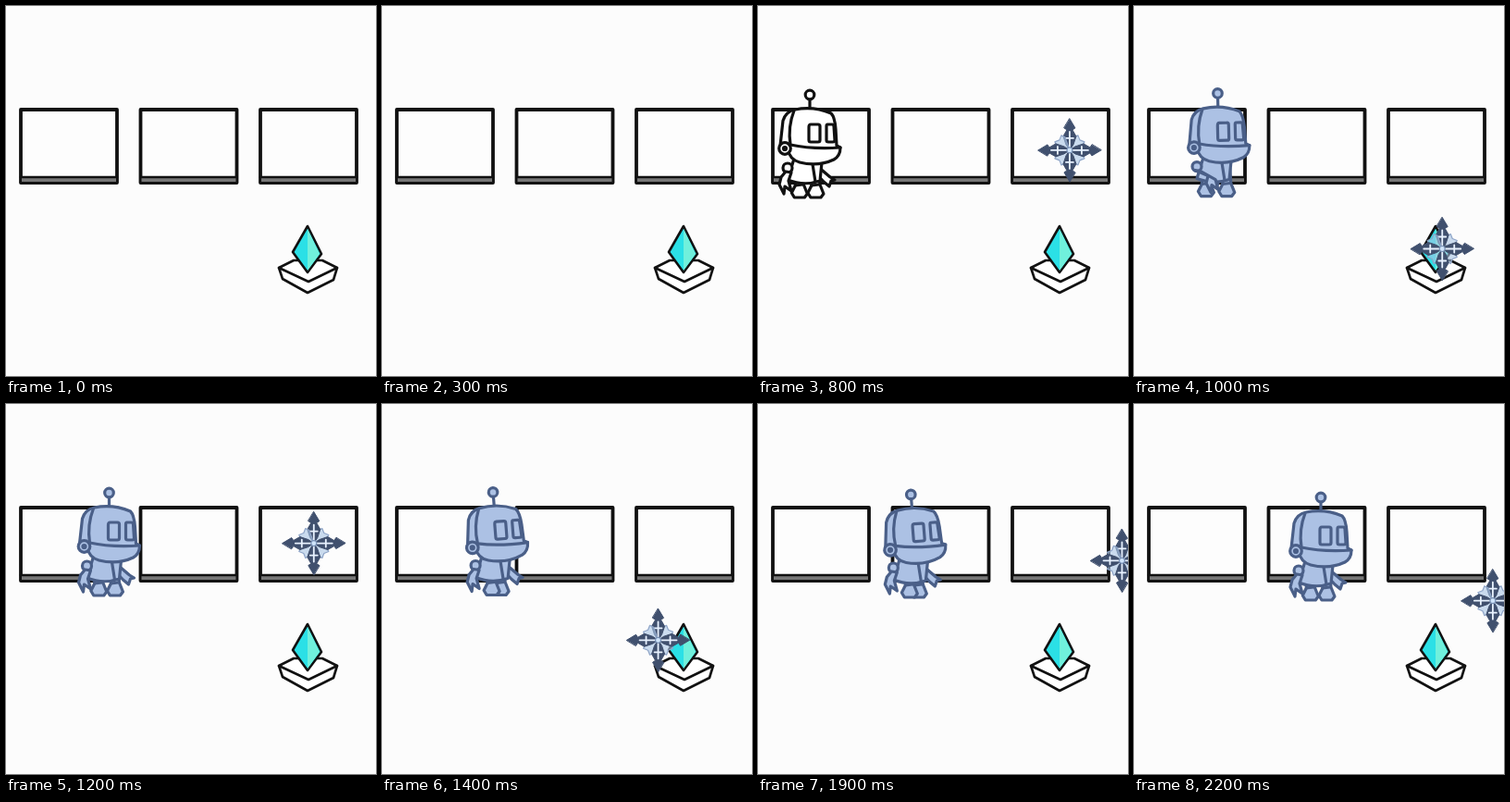
Animation of 400x400 px, one loop 2300 ms. Source, as an HTML page with a canvas:

```html
<!DOCTYPE html>
<html lang="en">
<head>
<meta charset="utf-8">
<title>Robot and crystal</title>
<style>
html, body { margin: 0; width: 100%; height: 100%; overflow: hidden; background: #fcfcfc; }
canvas { display: block; filter: blur(.6px); }
</style>
</head>
<body>
<canvas width="400" height="400"></canvas>
<script>
const ctx = document.querySelector('canvas').getContext('2d');
const LOOP = 2300, STEP = 100;
const ENTER = 300, FREEZE = 1000;
const FIRST_SHOT = 615, RELOAD = 379, FLIGHT = 325;

function pen(fill, stroke, width) {
  Object.assign(ctx, { fillStyle: fill, strokeStyle: stroke, lineWidth: width, lineJoin: 'round', lineCap: 'round' });
}

function draw(d) {
  const path = new Path2D(d);
  ctx.fill(path);
  ctx.stroke(path);
}

const line = d => ctx.stroke(new Path2D(d));

function dot(x, y, r) {
  ctx.beginPath();
  ctx.arc(x, y, r, 0, 7);
  ctx.fill();
  ctx.stroke();
}

function platform(x) {
  pen('#fdfdfd', '#111', 3.8);
  draw(`M${x} 112h104v79h-104z`);
  ctx.fillStyle = '#777';
  ctx.fillRect(x + 1, 185, 102, 5);
  ctx.lineWidth = 2.6;
  line(`M${x} 185h104`);
}

function crystal() {
  pen('#fff', '#111', 2.6);
  draw('M295 283L311 275H342L358 283L354 296L326 310L299 295Z');
  line('M295 283L327 298L358 283');
  pen('#2be0e6', '#111', 2.6);
  draw('M326 238L341 268L326 288L310 266Z');
  ctx.fillStyle = '#70f0dc';
  ctx.fill(new Path2D('M326 241L339 268L326 286Z'));
}

// The hit slows both the walk and its gait.
function walk(t) {
  const since = t - FREEZE, frozen = since >= 0;
  const phase = 2 * Math.PI * (.2 + since / (frozen ? 500 : 333));
  const lean = Math.max(0, Math.cos(phase));
  return {
    frozen, lean,
    x: 58.4 + since * (frozen ? .0905 : .187) - 4.5 * lean,
    y: Math.abs(since) / 200 - 2 - 1.5 * lean,
    stride: Math.abs(Math.sin(phase)),
    tuck: Math.max(0, Math.sin(phase))
  };
}

function foot(x) {
  draw(`M${x - 3} 178h8l1 16l4 10l-3 4h-11l-3-5l4-8z`);
  line(`M${x - 3} 195l8-1`);
}

function robot({ frozen, lean, x, y, stride, tuck }) {
  const left = 7 + 20 * tuck, right = 57 - 24 * tuck;
  pen(frozen ? '#acc1e4' : '#fff', frozen ? '#4a5f88' : '#111', 3.2);
  ctx.save();
  ctx.translate(x, y);

  draw(`M43 174L${right} 186l5 3l-4 1l-2 6l-6-5L40 180Z`);
  foot(37 + 5 * stride);
  foot(27 - 8 * stride);
  draw('M18 166L11 189Q29 196 46 190L48 170Z');
  line('M38 172l3 19');
  dot(11, 176, 5);
  draw(`M9 180L${left - 3} 186l-2 8l5 10l1-8l7 5l-3-11L15 181Z`);

  ctx.translate(31, 160);
  ctx.rotate(-.08 * lean);
  ctx.translate(-31, -160);
  line('M35 101v11');
  dot(35, 97, 4.8);
  draw('M3 152L6 125Q9 115 19 113Q39 109 58 117Q62 121 63 134L64 152L68 154Q68 163 61 167Q44 175 24 170Q13 167 11 155Z');
  line('M18 114Q11 132 14 151Q37 156 68 154');
  draw('M36 129h8q2 0 2 2v15q0 2-2 2h-8q-2 0-2-2v-14q0-3 2-3z');
  draw('M54 129h5q2 0 2 2l1 15q0 2-2 2h-5q-2 0-2-2v-15q0-2 1-2z');
  dot(8, 155, 6.3);
  dot(8, 155, 1.5);
  ctx.restore();
}

function snowflake(x, y) {
  ctx.save();
  ctx.translate(x, y);
  for (let i = 0; i < 4; i++) {
    pen('#a9c4e499', '#8fa5c8', 1.2);
    draw('M0 0L5 -14L9 -16L11 -11L16 -9L14 -5Z');
    pen('#40506e', '#40506e', 1);
    draw('M0 -34L6 -24L3 -22L7 -15L4 -6L0 0L-4 -6L-7 -15L-3 -22L-6 -24Z');
    pen('#fff', '#e8f2ff', 1.8);
    line('M0 0V-20M-4 -13H4');
    ctx.rotate(Math.PI / 2);
  }
  pen('#cfe4fa', '#7890b4', 1.2);
  dot(0, 0, 3);
  ctx.restore();
}

// Each shot bends towards the robot; every third swings out to the left.
function shot(n, t, hero) {
  const u = (t - FIRST_SHOT - n * RELOAD) / FLIGHT;
  if (u < 0 || u > 1) return;
  const [bendX, bendY] = n % 3 === 2 ? [155, 190] : [528, 118];
  const bezier = (a, b, c) => (1 - u) ** 2 * a + 2 * u * (1 - u) * b + u * u * c;
  snowflake(bezier(326, bendX, hero.x + 33), bezier(268, bendY, hero.y + 150));
}

function frame(now) {
  const t = Math.floor(now % LOOP / STEP) * STEP;
  const hero = walk(t);
  ctx.fillStyle = '#fcfcfc';
  ctx.fillRect(0, 0, 400, 400);
  for (let i = 0; i < 3; i++) platform(16 + 129.5 * i);
  crystal();
  if (t >= ENTER) robot(hero);
  for (let n = 0; n < 5; n++) shot(n, t, hero);
}

const began = performance.now();
function tick() {
  frame(performance.now() - began);
  requestAnimationFrame(tick);
}
tick();
</script>
</body>
</html>
```
